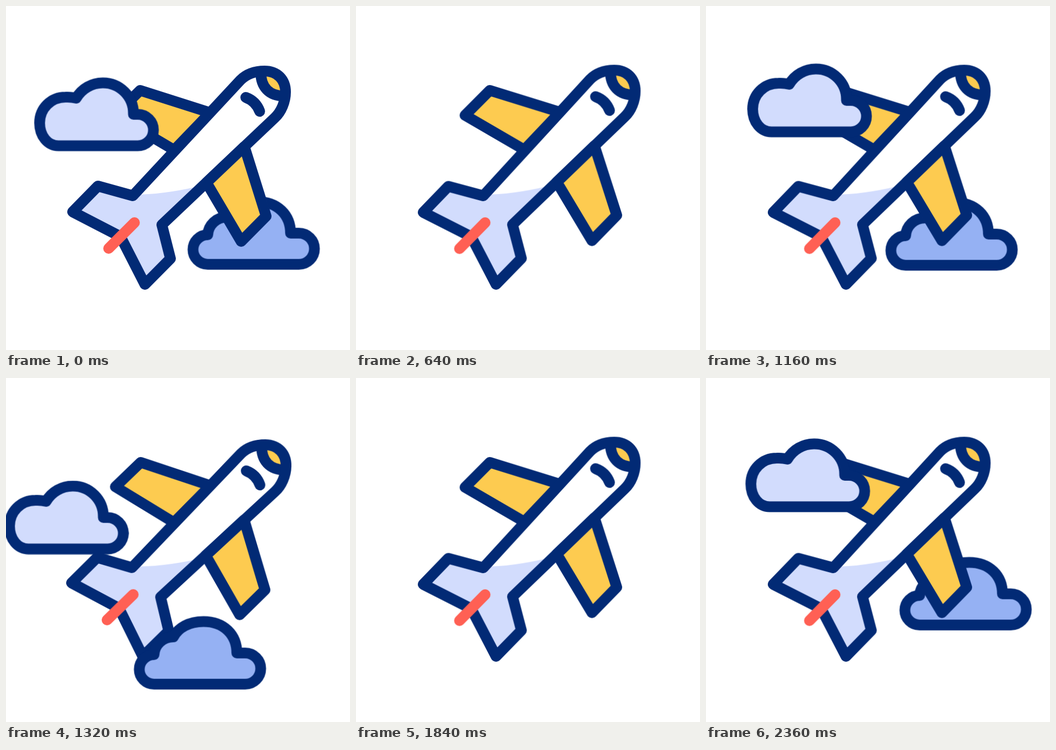
An HTML page that plays this animation: 640x640 px, repeating every 2.4 s.

```html
<!DOCTYPE html>
<html lang="en">
<head>
<meta charset="utf-8">
<title>Plane in the clouds</title>
<style>
  html, body { margin: 0; height: 100%; overflow: hidden; background: #fff; }
  svg { display: block; width: 100vw; height: 100vh; }
  .ink { stroke: #022a75; stroke-width: 20; stroke-linecap: round; stroke-linejoin: round; }
  .line { fill: none; }
  .sun { fill: #fdcb50; }
  .pale { fill: #d2dcfd; }
  .blue { fill: #95b1f3; }
  .bar { stroke: #ff6054; stroke-width: 20; stroke-linecap: round; }

  .plane {
    transform-box: view-box;
    transform-origin: 250px 235px;
    animation: sway 400ms linear infinite;
  }
  .near { animation: near 2400ms linear infinite; }
  .far { animation: far 2400ms linear infinite; }

  @keyframes sway {
    0%, 50%, 100% { transform: rotate(0deg); }
    25% { transform: rotate(1deg); }
    75% { transform: rotate(-1deg); }
  }
  /* Each cloud crosses the stage twice per loop and jumps back while out of view. */
  @keyframes near {
    0% { transform: translate(0, 0); }
    15% { transform: translate(-175px, 185px); }
    25% { transform: translate(-294px, 312px); }
    25.001% { transform: translate(298px, -317px); }
    40% { transform: translate(122px, -130px); }
    50.4% { transform: translate(0, 0); }
    55% { transform: translate(-56px, 58px); }
    75% { transform: translate(-294px, 312px); }
    75.001% { transform: translate(298px, -317px); }
    93.333% { transform: translate(81px, -85px); }
    98.333% { transform: translate(21px, -20.5px); }
    100% { transform: translate(0, 0); }
  }
  @keyframes far {
    0% { transform: translate(0, 0); }
    15% { transform: translate(-231px, 214px); }
    25% { transform: translate(-385px, 360px); }
    25.001% { transform: translate(335px, -335px); }
    40% { transform: translate(112px, -112px); }
    46.667% { transform: translate(20px, -20px); }
    55% { transform: translate(-100px, 89px); }
    75% { transform: translate(-385px, 360px); }
    75.001% { transform: translate(332px, -320px); }
    98.333% { transform: translate(22px, -21px); }
    100% { transform: translate(0, 0); }
  }
</style>
</head>
<body>
<svg viewBox="0 0 640 640">
  <g class="plane">
    <path class="ink sun" d="M380 198.500 249.500 157 203 203 313 268Z"/>
    <path fill="#fff" d="M236 353 436 138C448 126 464 121 481 121 505 121 520 137 520 160 520 178 512 197 500 208L290 407Z"/>
    <path class="pale" d="M124 383 171 335 236 351Q291 351 356 336L290 407 306 470 258.500 518 213 429Z"/>
    <path class="sun" d="M474 121H481C505 121 520 137 520 160V168C488 168 474 150 474 121Z"/>
    <path class="ink line" d="M474 123C474 150 489 167.500 518 167.500"/>
    <path class="ink line" d="M124 383 171 335 236 353 436 138C448 126 464 121 481 121 505 121 520 137 520 160 520 178 512 197 500 208L290 407 306 470 258.500 518 213 429Z"/>
    <path class="ink line" d="M446 170Q465 177 472 196"/>
    <path class="bar" d="M191 451 239 403"/>
  </g>

  <path class="far ink blue" d="M376 480A27.500 27.500 0 0 1 376 425C377 407 392 392 412 392 421 375 441 363.500 468 363.500 506 363.500 530 388 530 422H545.500A29 29 0 0 1 545.500 480Z"/>

  <path class="plane ink sun" d="M443.500 261.500 484 391 437.500 438 373 328.500Z"/>

  <path class="near ink pale" d="M98 259.500C78 259.500 63 241 63 217 63 190 84 169 111 169Q123 168.500 131 171A57 57 0 0 1 181 142.500 56.500 56.500 0 0 1 237.500 199V201H245.500A29.250 29.250 0 0 1 245.500 259.500Z"/>
</svg>
</body>
</html>
```
